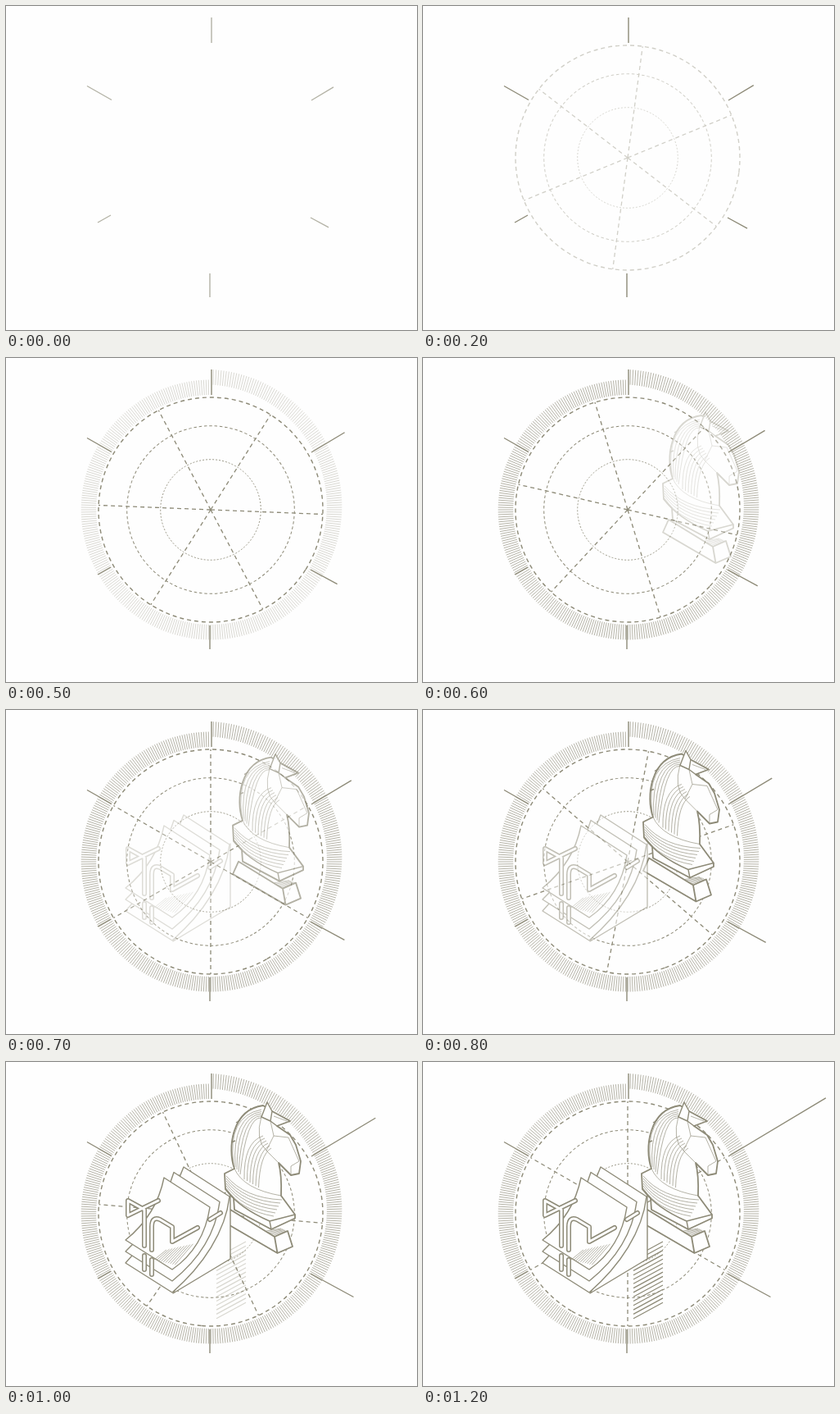
An HTML page that plays this animation: 502 px wide and 395 px high, repeating every 1300 ms.

```html
<!DOCTYPE html>
<html lang="en">
<head>
<meta charset="utf-8">
<title>Drawing with knight and paper holder</title>
<style>
  html, body { margin: 0; width: 100%; height: 100%; overflow: hidden; background: #fefefe; }
  svg { display: block; }
  path, circle { fill: none; stroke: #8d8a77; stroke-width: 1.4; stroke-linejoin: round; }
  .solid { fill: #fefefe; }
  .bold { stroke-width: 1.8; }
  .thin { stroke-width: .65; }
  .tube { stroke-width: 6; stroke-linecap: round; }
  .core { stroke: #fefefe; stroke-width: 3; stroke-linecap: round; }
</style>
</head>
<body>
<svg width="502" height="395" viewBox="0 0 502 395">
  <g id="wheel">
    <circle r="137" stroke-dasharray="5 4"/>
    <circle r="102.3" style="stroke-width:1" stroke-dasharray="3.5 2.8"/>
    <circle r="61.3" style="stroke-width:.8" stroke-dasharray="2 2"/>
    <path id="spokes" style="stroke-width:1.3" stroke-dasharray="5 4"/>
  </g>
  <path id="ring" class="thin"/>
  <path id="shade" style="stroke-width:1.2"/>

  <g id="knight">
    <path class="solid bold" d="M274 180L328 213 344 206 350 225 331.500 233 267 195.500ZM328 213L331.500 233"/>
    <path class="thin" id="baseHatch"/>
    <path class="solid bold" d="M267 136L268 155 278 166 279 180 324 204 353 190.500V186L336 163Q337 138 333 123
      L348 138 358 136 360 121 354 101 347 89 331 78 347 72 325 60 314 53C276 58 270 105 279 130Z"/>
    <path d="M268 155Q285 178 322 194L353 186M322 194L324 204M281 74L286 71M275 98L280 96"/>
    <path class="thin" d="M279 130Q290 155 336 163M312 66Q304 95 318 108L333 123M318 108L327 90 345 92 358 121 348 127V138
      M327 90L323 72M327 66L343 72"/>
    <path class="thin" id="knightHatch"/>
    <path class="solid" d="M312 67L319 49 325 60 323 72ZM323 72L331 78"/>
  </g>

  <g id="holder">
    <path class="solid" d="M274 163V240L204 282Z"/>
    <g id="sheets"></g>
    <path class="thin" id="sheetHatch"/>
    <g id="tubes"></g>
  </g>

  <path id="marks"/>
</svg>
<script>
const STEP = 100, STEPS = 13;
const $ = id => document.getElementById(id);
const repeat = (n, fn) => Array.from({ length: n }, (_, i) => fn(i)).join("");
const setPath = (id, d) => $(id).setAttribute("d", d);
const rise = (k, from, to, power = 1) =>
  Math.min(1, Math.max(0, (k - from) / (to - from))) ** power;
const fall = (k, from, to, power = 1) => (1 - rise(k, from, to)) ** power;

// Radial line between two radii, the angle measured clockwise from the top.
function ray(deg, inner, outer) {
  const a = deg * Math.PI / 180;
  const at = r => `${(r * Math.sin(a)).toFixed(2)} ${(-r * Math.cos(a)).toFixed(2)}`;
  return `M${at(inner)}L${at(outer)}`;
}

function buildScene() {
  setPath("spokes", repeat(6, i => ray(60 * i, 0, 137)));

  // The ring starts wide at the top and narrows over the first third of a turn.
  const ticks = 336;
  $("ring").setAttribute("transform", "translate(250.2 185)");
  setPath("ring", repeat(ticks - 1, i => {
    const deg = (i + 1) * 360 / ticks;
    const outer = 158.5 + 12.5 * fall(deg, 0, 120, 1.5);
    return ray(deg, outer - 18.5, outer);
  }));

  setPath("shade", repeat(15, i => `M257 ${238.5 + 5.3 * i}l36 -19.5`));
  setPath("baseHatch", repeat(5, i => `M${318 + 2 * i} ${206 + 1.4 * i}L${336 + 1.7 * i} ${203 + .7 * i}`));

  const mane = i => `M${278 + 2 * i} ${125 + 3 * i}Q${270 + 6 * i} 66 312 ${58 + 2.5 * i}`;
  const neck = i => `M${291 + 3.5 * i} ${143 + 2 * i}Q${290 + 4 * i} ${98 + 3 * i} ${314 + 2 * i} ${90 + 3 * i}`;
  const collar = i => `M269 ${139 + 3 * i}Q${292 - i} ${166 + 3 * i} ${337 - 2 * i} ${168 + 4 * i}`;
  setPath("knightHatch", repeat(5, mane) + repeat(6, neck) + repeat(6, collar));

  // Three curled sheets, drawn from back to front.
  $("sheets").innerHTML = repeat(3, i => {
    const n = 2 - i, x = 12 * n, y = 6.5 * n, drop = 14 * n;
    return `<path class="solid" d="M${193 + x} ${141 - y}L${249 + x} ${177 - y}
      C${244 + x} ${210 - y / 4} ${229 + x / 2} ${235 + y} 203 ${253 + drop}
      L146 ${217 + drop}C${171 + x / 3} ${197 + y} ${187 + x / 2} ${171 + y / 4} ${193 + x} ${141 - y}Z"/>`;
  });
  setPath("sheetHatch", repeat(10, i => `M${181 + 2.8 * i} ${241 + .7 * i}L${196 + 3.6 * i} ${229 - .8 * i}`));

  const tubes = [
    "M169 236V253", "M178 241V259", "M249 192L262 184",
    "M186 169L149 187V169L169 180V224",
    "M178 229V201Q178 188 188 192L203 201V219L234 202"
  ];
  $("tubes").innerHTML = tubes.map(d =>
    `<path class="tube" d="${d}"/><path class="core" d="${d}"/>`).join("");
}

function draw(k) {
  // The wheel gathers speed, skips ahead, then turns almost evenly.
  const turn = 43 * rise(k, 0, 6, 1.57) + 17 * rise(k, 6, 7) + 60 * rise(k, 7, 12, 1.07);
  $("wheel").setAttribute("transform", `translate(250 185) rotate(${turn})`);
  $("wheel").style.opacity = rise(k, 0, 5);
  $("ring").style.opacity = rise(k, 4, 6);
  $("shade").style.opacity = rise(k, 9, 12);

  $("knight").setAttribute("transform",
    `translate(${26 * fall(k, 6, 9, 2.35)} ${17 * fall(k, 6, 9, 3.2)})`);
  $("knight").style.opacity = rise(k, 5, 8);
  $("holder").style.opacity = rise(k, 6, 10, .9);

  const upper = 27 + 31 * rise(k, 0, 9, 1.4) + 61 * rise(k, 9, 12);
  const lower = 22 + 30.5 * rise(k, 0, 9, 1.8);
  setPath("marks", `M251 14V45M99 97.500L129 114.500M112 264L128 255M249 326V355
    M373 115l${upper} ${-.597 * upper}M372 258l${lower} ${.543 * lower}`);
  $("marks").style.opacity = .65 + .35 * rise(k, 0, 2);
}

function tick() {
  draw(Math.floor(performance.now() / STEP) % STEPS);
  requestAnimationFrame(tick);
}

buildScene();
tick();
</script>
</body>
</html>
```
